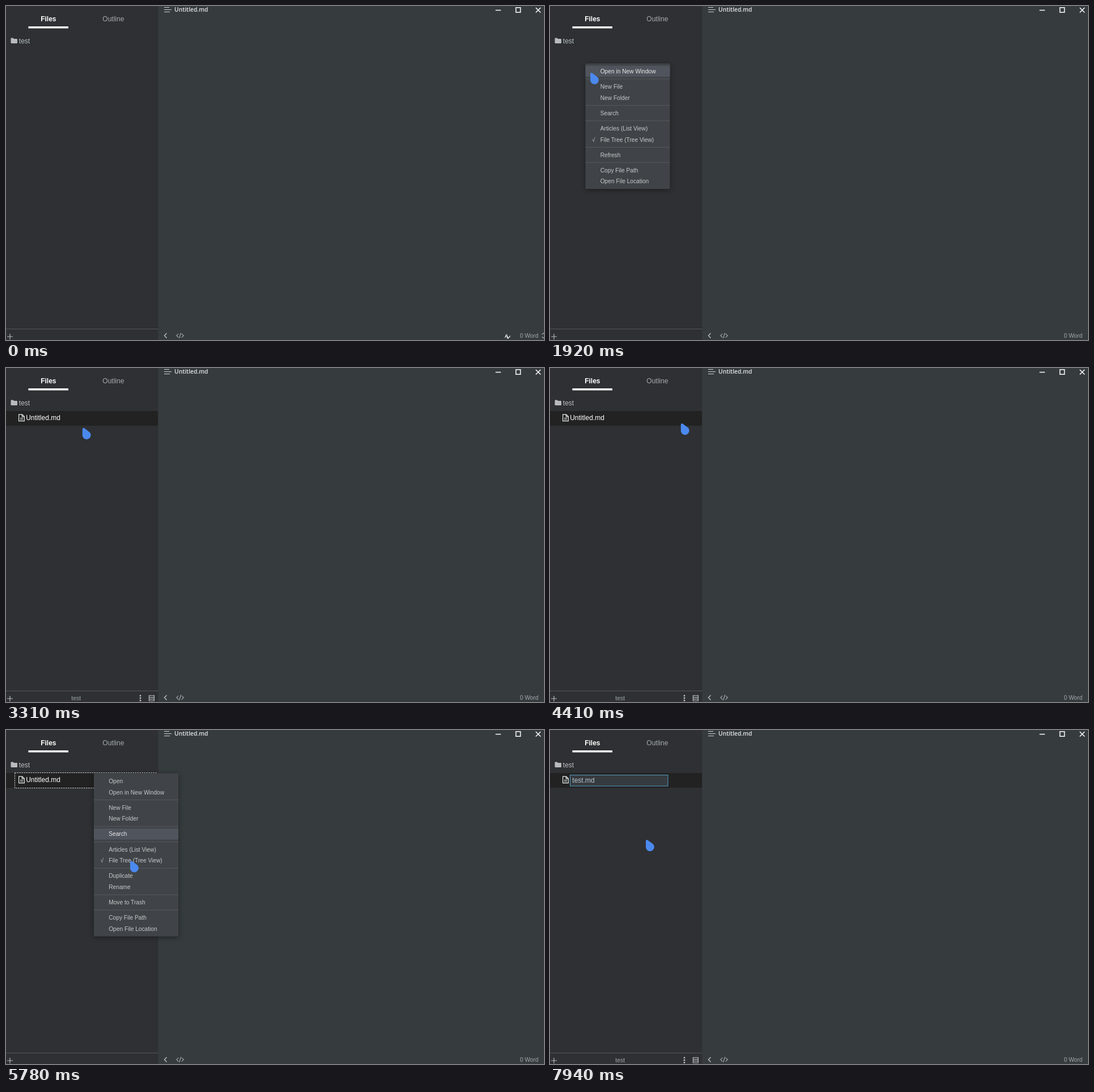
Write an HTML page that moves like this. It is 949x590 px and loops after 8000 ms.

```html
<!DOCTYPE html>
<html lang="en">
<head>
<meta charset="utf-8">
<title>Renaming a file</title>
<style>
  html, body { margin: 0; width: 100%; height: 100%; overflow: hidden; background: #363b3e; }
  svg { display: block; width: 949px; height: 590px; }
  text { font-family: "Liberation Sans", Arial, sans-serif; font-size: 12px; white-space: pre; }
  .line { fill: none; stroke-width: 1.2; }
  .menu text { font-size: 10.2px; fill: #c6c8ca; }
  .menu .hot text { fill: #e6e8ea; }
  .menu .hot rect { fill: #50545c; }
  .menu .bg { filter: drop-shadow(0 2px 4px rgba(0, 0, 0, .4)); }
  .status { font-size: 10.2px; fill: #a2a8ac; }
</style>
</head>
<body>
<svg viewBox="0 0 949 590">
  <rect width="949" height="590" fill="#363b3e"/>
  <rect width="268.5" height="590" fill="#2e3033"/>

  <!-- title bar -->
  <path class="line" stroke="#d0d3d5" d="M279 2.5h9M279 6.5h13M279 10.5h10"/>
  <text x="297" y="10" fill="#e4e6e7" style="font: 600 10.3px 'Open Sans', sans-serif">Untitled.md</text>
  <g class="line" stroke="#fff" style="stroke-width:1.5">
    <path d="M863.5 7.5h9.5M934.5 3l8.5 8.5M943 3l-8.5 8.5"/>
    <rect x="899.5" y="2.8" width="8" height="8.4"/>
  </g>

  <!-- sidebar -->
  <text x="61.2" y="27" fill="#fff" font-weight="bold">Files</text>
  <text x="170.3" y="27" fill="#a5aab0">Outline</text>
  <rect x="39.5" y="36" width="70.5" height="3.5" fill="#fff"/>
  <path id="folder" fill="#b8babc" d="M8.5 57.7q0-1.2 1.2-1.2h2.8q1 0 1.2 1.5h5q1.3 0 1.3 1.2v5.6q0 1.2-1.2 1.2h-9q-1.3 0-1.3-1.2z"/>
  <path id="caret" fill="#b8babc" d="M9 59h10l-5 6z"/>
  <text x="22.8" y="65.6" fill="#b8bfc6">test</text>

  <g id="row">
    <rect y="76" width="268" height="26" fill="#222"/>
    <rect id="dash" x="15.5" y="75.5" width="250.5" height="27" class="line" stroke="#d8d8d8" stroke-dasharray="2.4 1.6" style="stroke-width:1"/>
    <path class="line" stroke="#e8eaeb" d="M22.6 82.1h6l3.8 3.6v8h-9.8zM28.3 82.3v3.6h3.8M24.8 88.5h5.4M24.8 91h5.4"/>
    <text id="name" x="35.2" y="92" fill="#fff">Untitled.md</text>
    <g id="field">
      <rect x="35.5" y="79.5" width="172.5" height="19.5" fill="#363b40" stroke="#559dbd"/>
      <rect id="select" x="39.5" y="82" width="38" height="14" fill="#4a89dc"/>
      <text id="typed" x="39.3" y="93" fill="#b8c4cc"></text>
      <rect id="bar" y="82" width="1" height="14" fill="#d8dee2"/>
    </g>
  </g>

  <path d="M0 570.5h268.5" stroke="#54575a"/>
  <path class="line" stroke="#b4babf" d="M2 584h10M7 579v10"/>
  <g id="footer">
    <text class="status" x="115.3" y="587" style="font-size:10.4px">test</text>
    <g fill="#c0c4c8"><circle cx="237" cy="579" r="1.4"/><circle cx="237" cy="583.2" r="1.4"/><circle cx="237" cy="587.4" r="1.4"/></g>
    <path class="line" stroke="#b8bcc0" d="M252.4 578.5h9v9.5h-9zM252.4 581.7h9M252.4 584.9h9"/>
  </g>

  <!-- status bar -->
  <path class="line" stroke="#b4babe" style="stroke-width:1.5" d="M283.5 578l-4 4.2 4 4.2"/>
  <path class="line" stroke="#a2a8ac" d="M304.3 578.8l-3.4 3.4 3.4 3.4M309.8 578.8l3.4 3.4-3.4 3.4M308.6 577.5l-3 9.5"/>
  <text class="status" x="906.4" y="586">0 Word</text>
  <g id="extras">
    <text x="879.5" y="585.5" fill="#fff" font-weight="bold" style="font-size:9px">A</text>
    <path class="line" stroke="#fff" d="M883.5 585l2 2.3 4-4.6"/>
    <path class="line" stroke="#a2a8ac" d="M945.5 580.5l2.7-2.6 2.7 2.6M945.5 584l2.7 2.6 2.7-2.6"/>
  </g>

  <g id="menus"></g>
  <path id="pointer" fill="#4b89ef" d="M1.5 0Q3-.2 5 1.7L11.9 6.8A7.4 7.4 0 1 1 0 12V2Q.2.2 1.5 0z"/>
  <circle id="click" r="10" fill="#ff0" opacity=".5"/>
</svg>
<script>
const LOOP = 8000;
const $ = id => document.getElementById(id);
const show = (el, on) => { el.style.display = on ? '' : 'none'; };

function add(parent, tag, attrs, text) {
  const el = document.createElementNS('http://www.w3.org/2000/svg', tag);
  for (const k in attrs) el.setAttribute(k, attrs[k]);
  if (text) el.textContent = text;
  return parent.appendChild(el);
}

const FILES = ['New File', 'New Folder'];
const VIEWS = ['Articles (List View)', 'File Tree (Tree View)'];
const PATHS = ['Copy File Path', 'Open File Location'];

function makeMenu(x, y, groups) {
  const g = add($('menus'), 'g', { class: 'menu', transform: `translate(${x} ${y})` });
  const bg = add(g, 'rect', { class: 'bg', width: 149, fill: '#404448' });
  const items = [];
  let mid = 13.7;
  groups.forEach((group, i) => {
    if (i) {
      add(g, 'path', { d: `M0 ${mid - 13.5}h149`, stroke: '#56595d' });
    }
    group.forEach((label, j) => {
      const item = add(g, 'g', {});
      add(item, 'rect', { y: mid - 9.8, width: 149, height: 19.6, fill: 'none' });
      add(item, 'text', { x: 26.2, y: mid + 3.6 }, label);
      if (label === VIEWS[1]) add(item, 'text', { x: 11.5, y: mid + 3.6 }, '√');
      items.push({ el: item, y: y + mid });
      mid += j < group.length - 1 ? 19.7 : 27.1;
    });
  });
  bg.setAttribute('height', mid - 13.8);
  return { g, items };
}

const menus = [
  { from: 1450, to: 2270, ...makeMenu(62.5, 101.5,
    [['Open in New Window'], FILES, ['Search'], VIEWS, ['Refresh'], PATHS]) },
  { from: 5100, to: 6260, ...makeMenu(155, 76.5,
    [['Open', 'Open in New Window'], FILES, ['Search'], VIEWS,
     ['Duplicate', 'Rename'], ['Move to Trash'], PATHS]) },
];

// time, x, y of the pointer tip
const path = [
  [0, 890, 592], [70, 850, 575], [350, 480, 345], [630, 160, 160], [840, 67, 113], [910, 62, 112],
  [1850, 62, 112], [1990, 80, 124], [2130, 92, 135],
  [2610, 92, 135], [2820, 104, 150], [3100, 125, 130], [3380, 138, 98], [3520, 138, 89],
  [3780, 138, 89], [3950, 175, 68], [4200, 267, 72], [4410, 231, 98], [4550, 205, 97],
  [4830, 170, 90], [4970, 154, 87],
  [5430, 154, 87], [5570, 176, 125], [5710, 208, 190], [5780, 219, 231], [5920, 222, 262], [6060, 220, 275],
  [7450, 220, 275], [7660, 200, 240], [7870, 174, 202], [7940, 169, 194], [8000, 169, 194],
];
const clicks = [[1380, 1520], [2270, 2410], [5030, 5170], [6260, 6330]];
const typing = [[6330, 'Untitled'], [6920, 't'], [7050, 'te'], [7120, 'tes'], [7190, 'test']];
const stemWidth = { t: 3, te: 10, tes: 16.5, test: 20 };

function tipAt(t) {
  const i = Math.max(1, path.findIndex(p => p[0] >= t));
  const [t0, x0, y0] = path[i - 1], [t1, x1, y1] = path[i];
  const k = Math.max(0, (t - t0) / (t1 - t0));
  return [x0 + (x1 - x0) * k, y0 + (y1 - y0) * k];
}

function render(t) {
  const [x, y] = tipAt(t);
  const within = ([a, b]) => t >= a && t < b;
  $('pointer').setAttribute('transform', `translate(${x} ${y})`);
  $('click').setAttribute('cx', x + 1);
  $('click').setAttribute('cy', y);
  show($('pointer'), t >= 70);
  show($('click'), clicks.some(within));
  show($('extras'), t < 350);

  // the highlight trails the pointer slightly
  const hoverY = tipAt(Math.max(0, t - 70))[1];
  for (const m of menus) {
    show(m.g, within([m.from, m.to]));
    const moved = t > m.from + 330;
    for (const it of m.items) {
      it.el.setAttribute('class', moved && Math.abs(hoverY - it.y) < 9.9 ? 'hot' : '');
    }
  }
  const busy = within([1450, 2340]) || within([5100, 6330]);
  show($('footer'), t >= 1240 && !busy && !within([4150, 4270]));

  const onFolder = within([3780, 4410]) && y < 75;
  show($('folder'), !onFolder);
  show($('caret'), onFolder);

  const editing = t >= 6330;
  show($('row'), t >= 2340);
  show($('dash'), within([5100, 6330]));
  show($('name'), !editing);
  show($('field'), editing);
  if (editing) {
    const stem = typing.filter(s => s[0] <= t).pop()[1];
    $('typed').textContent = stem + '.md';
    show($('select'), stem === 'Untitled');
    $('bar').setAttribute('x', 39.3 + (stemWidth[stem] || 0));
    show($('bar'), within([6920, 7690]));
  }
}

function tick() {
  render(performance.now() % LOOP);
  requestAnimationFrame(tick);
}
tick();
</script>
</body>
</html>
```
